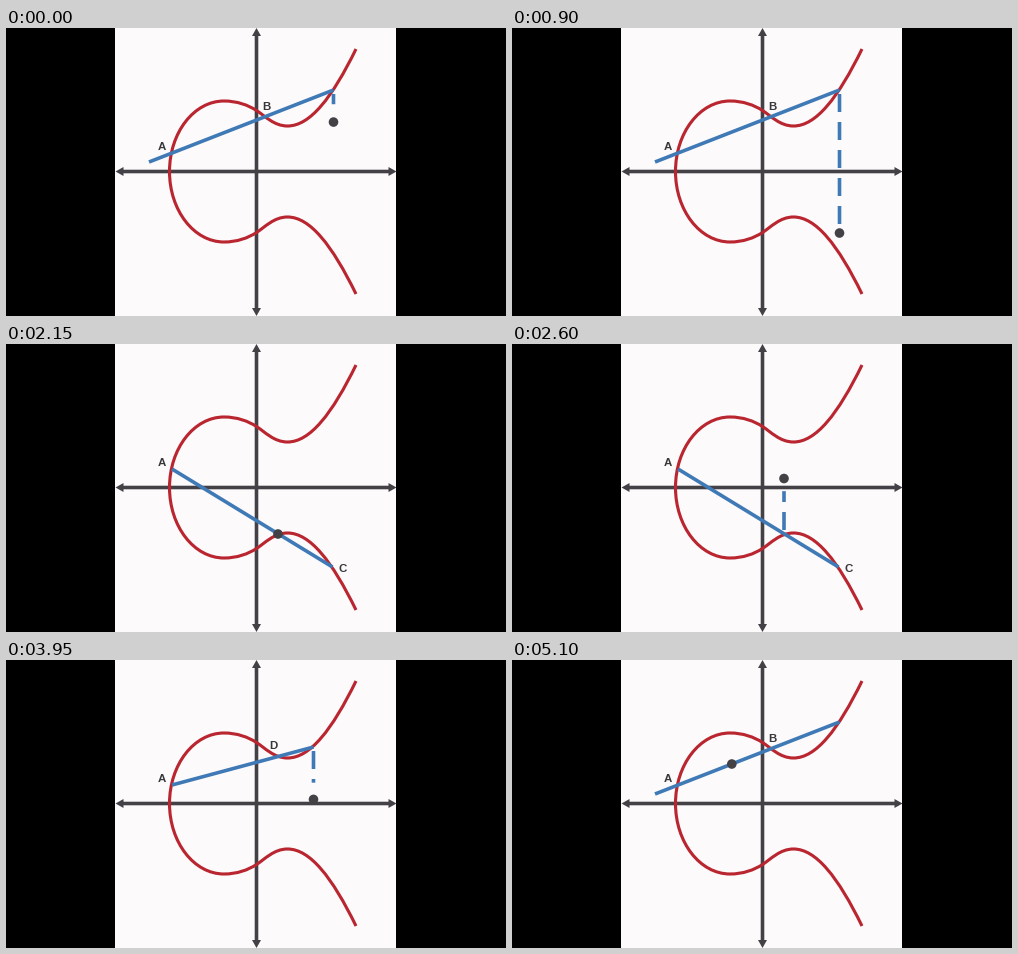
These frames come from a looping animation (500x288 px, 5.15 s). A matplotlib script:

```python
import numpy as np
import matplotlib.pyplot as plt
from matplotlib.animation import FuncAnimation
from matplotlib.patches import Circle, PathPatch, Polygon, Rectangle
from matplotlib.path import Path

W, H, DPI = 500, 288, 100
STEP, LOOP = 50, 5150
PX = 72 / DPI
PAPER, INK, RED, BLUE = "#fcfafb", "#434146", "#b92630", "#3f7ab6"
CX, CY = 250.5, 143.5

ROLL, FALL = 0.165, 0.1233        # dot speeds in px per ms
TRAIL = 100                       # ms the launch point stays marked
DASH, PERIOD, INSET = 18, 28, 4

A = np.array([166, 125])
TAIL = np.array([143, 134])
AB_HIT = np.array([327.5, 62])
AC_HIT = np.array([272, 190])
AD_HIT = np.array([307.5, 87])
NEVER = 10 * LOOP


def mirror(p):
    return np.array([p[0], 2 * CY - p[1]])


C, D = mirror(AB_HIT) - (1, 2), mirror(AC_HIT)

# Begin, chord ends, labels, launch point, launch time, hit point, drop time
SHOTS = [
    (0, (TAIL, AB_HIT), "AB", A, -NEVER, AB_HIT, -260),
    (1350, (A, C), "AC", C, 1600, AC_HIT, 2150),
    (3000, (A, AD_HIT), "AD", D, 3100, AD_HIT, 3525),
    (4450, (TAIL, AB_HIT), "AB", A, 4750, AB_HIT, NEVER),
]
LABELS = {"A": (156, 118), "B": (260.5, 77.5), "C": (336.5, 224.5), "D": (267, 85)}

fig = plt.figure(figsize=(W / DPI, H / DPI), dpi=DPI, facecolor="black")
ax = fig.add_axes([0, 0, 1, 1])
ax.set(xlim=(0, W), ylim=(H, 0))
ax.axis("off")


def stroke(xs, ys, color, width, z):
    return ax.plot(xs, ys, color=color, lw=width * PX, zorder=z,
                   solid_capstyle="butt", snap=False)[0]


def dot(z):
    return ax.add_patch(Circle((0, 0), 4.8, fc=INK, ec="none", zorder=z))


def draw_axes():
    ax.add_patch(Rectangle((109, 0), 281, H, fc=PAPER, ec="none", zorder=0))
    stroke([114, 386], [CY, CY], INK, 3.6, 1)
    stroke([CX, CX], [5, 283], INK, 3.6, 1)
    for tip, d in [((109.5, CY), (1, 0)), ((390.5, CY), (-1, 0)),
                   ((CX, 0), (0, 1)), ((CX, H), (0, -1))]:
        tip, d = np.array(tip), np.array(d)
        base, side = tip + 8 * d, 4.5 * d[::-1]
        ax.add_patch(Polygon([tip, base + side, base - side],
                             fc=INK, ec="none", zorder=1))


def draw_curve():
    top = np.array([
        (163.5, CY), (163.5, 104.6), (188, 73), (218, 73),
        (231, 73), (242, 77), (250.5, 82.5),
        (259, 88), (268, 98), (281.5, 98),
        (304, 98), (326, 70), (350, 21),
    ])
    bottom = [mirror(p) for p in top[1:]]
    verts = np.vstack([top[::-1], bottom])
    codes = [Path.MOVETO] + [Path.CURVE4] * (len(verts) - 1)
    ax.add_patch(PathPatch(Path(verts, codes), fc="none", ec=RED,
                           lw=3.1 * PX, capstyle="butt", zorder=2))


draw_axes()
draw_curve()
chord = stroke([], [], BLUE, 3.6, 3)
dashes = [stroke([], [], BLUE, 3.6, 3) for _ in range(6)]
ghost, ball = dot(4), dot(5)
labels = {
    c: ax.text(*p, c, color="#38373a", fontsize=11.5 * PX, fontweight="bold",
               family="Liberation Sans", ha="center", va="center_baseline",
               zorder=6)
    for c, p in LABELS.items()
}


def travel(p, q, dist):
    """Point reached after dist px on the way from p to q, and the share done."""
    share = np.clip(dist / np.hypot(*(q - p)), 0, 1)
    return p + (q - p) * share, share


def draw_drop(hit, share):
    """Dashes trail behind the falling dot and catch up at the end."""
    full = 2 * (CY - hit[1])
    shown = abs(full) * share ** 1.5
    for i, line in enumerate(dashes):
        a = INSET + i * PERIOD
        b = max(a, min(a + DASH, shown))
        line.set_data([hit[0]] * 2, hit[1] + np.sign(full) * np.array([a, b]))
        line.set_visible(b > a)


def update(i):
    t = i * STEP
    _, ends, names, start, launch, hit, drop = [s for s in SHOTS if s[0] <= t][-1]

    pos, _ = travel(start, hit, ROLL * (t - launch))
    share = 0
    if t >= drop:
        pos, share = travel(hit, mirror(hit), FALL * (t - drop))
    draw_drop(hit, share)

    chord.set_data(*zip(*ends))
    ball.center = tuple(pos)
    ghost.center = tuple(start)
    ghost.set_visible(0 <= t - launch < TRAIL)
    landed = "C" if names == "AB" and share == 1 else ""
    for name, text in labels.items():
        text.set_visible(name in names + landed)
    return [chord, *dashes, ghost, ball, *labels.values()]


anim = FuncAnimation(fig, update, frames=LOOP // STEP, interval=STEP,
                     repeat=True, repeat_delay=0, blit=False)
plt.show()
```
